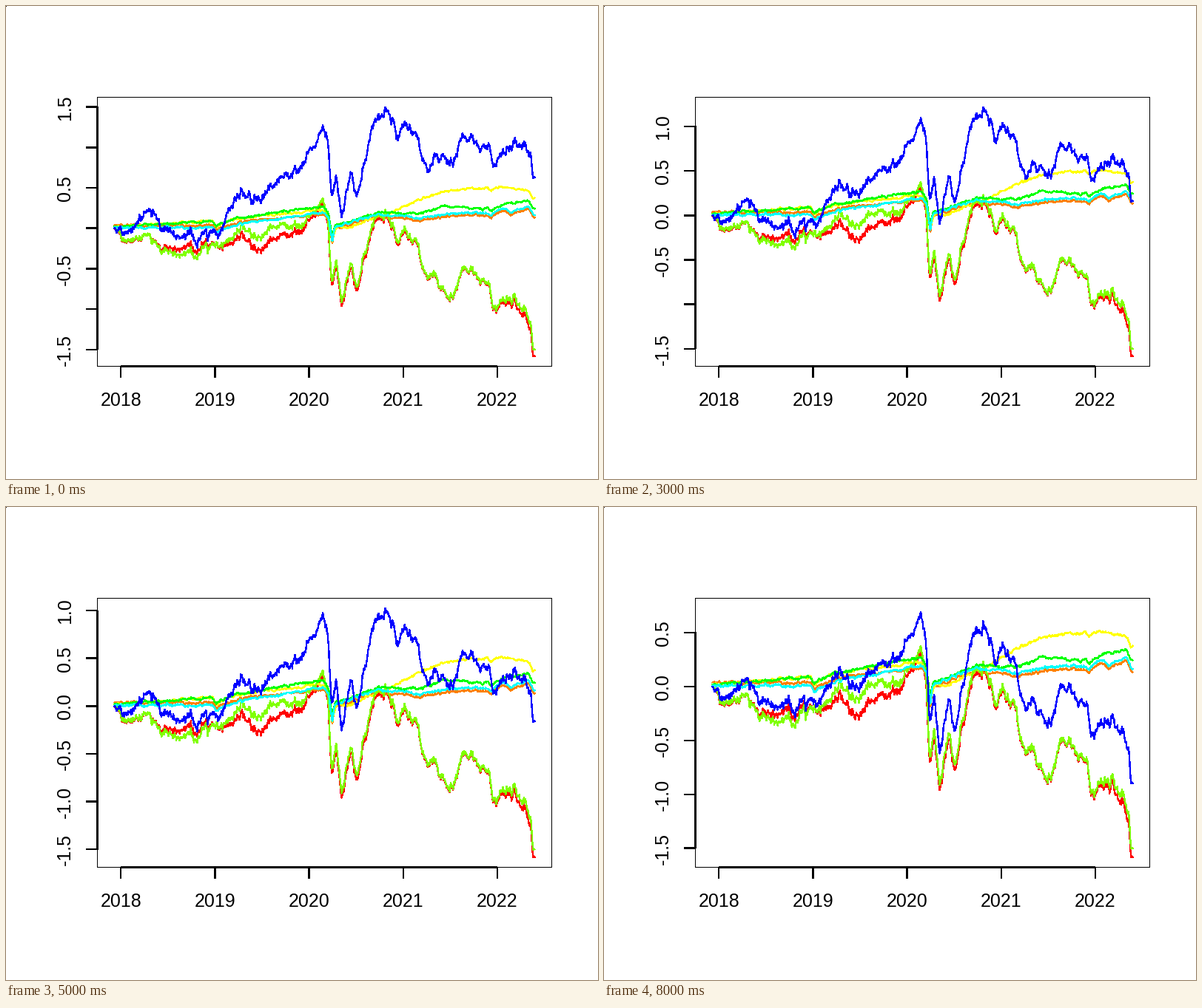
A matplotlib script that plays this animation: 800x640 px, repeating every 9000 ms.

```python
import numpy as np
import matplotlib.pyplot as plt
from matplotlib.animation import FuncAnimation

W, H, DPI = 800, 640, 100
LEFT, RIGHT, TOP, BOTTOM = 123.5, 737.5, 123.5, 487.5
PX = 72 / DPI
LOW = -1.584        # smallest value of any series
DAYS, STEPS = 1130, 9

rng = np.random.default_rng(7)
x = np.linspace(146, 715, DAYS)


def path(*points):
    """Piecewise-linear curve through (pixel x, value in hundredths)."""
    px, v = zip(*points)
    return np.interp(x, px, v) / 100


def bump(center, width):
    return np.exp(-((x - center) / width) ** 2)


def shock(at, depth, recovery):
    """Sudden fall that heals exponentially."""
    fall = np.clip((x - at + 5) / 5, 0, 1)
    return -depth * fall * np.exp(-np.maximum(x - at, 0) / recovery)


def jitter(sd, phi=0.8):
    """Mean-reverting daily noise, pinned to zero at both ends."""
    out = np.zeros(DAYS)
    for i, e in enumerate(rng.normal(0, sd * np.sqrt(1 - phi**2), DAYS - 1), 1):
        out[i] = phi * out[i - 1] + e
    return out * np.clip(np.minimum(x - 146, 715 - x) / 5, 0, 1)


def fund(*points, crash=0.27, recovery=3):
    return (path(*points) + shock(284, 0.08, 15) + shock(441, crash, recovery)
            + shock(656, 0.05, 5) + jitter(0.008))


# Volatile index, its close follower, and the blue portfolio's lead over it
red = path((146, 0), (172, -17), (190, -7), (209, -22), (257, -25), (270, -15),
           (295, -25), (317, -9), (342, -28), (367, -8), (400, 0), (428, 34),
           (436, 0), (440, -75), (446, -46), (454, -92), (467, -50),
           (474, -80), (495, 2), (516, 18), (530, -23), (538, -2), (557, -20),
           (564, -54), (578, -56), (587, -77), (604, -91), (617, -49),
           (652, -71), (657, -95), (688, -90), (709, -124), (712, -158),
           (715, -158))
red = np.maximum(red + jitter(0.033), LOW)
lime = (red - 0.09 * bump(245, 35) + 0.15 * bump(350, 45)
        + 0.04 * bump(470, 60) + 0.07 * bump(715, 40) + 0.01)
lead = path((146, 0), (197, 34), (230, 14), (288, 14), (304, 48), (358, 66),
            (420, 88), (436, 106), (516, 130), (575, 136), (590, 168),
            (640, 162), (715, 221)) + jitter(0.02)
loss = np.interp(x, [146, 428, 454, 715], [0.5, 0.62, 0.69, 0.69])

# Calm funds
yellow = fund((146, 2), (278, 9), (428, 23), (460, 0), (520, 20), (556, 34),
              (590, 45), (670, 52), (706, 46), (712, 36), (715, 38),
              crash=0.3, recovery=5)
green = fund((146, 2), (278, 9), (428, 27), (450, 5), (505, 19), (557, 18),
             (590, 28), (645, 24), (705, 35), (712, 25), (715, 24))
cyan = fund((146, 1), (278, 1), (428, 19), (450, 4), (505, 17), (557, 13),
            (620, 20), (650, 18), (672, 25), (682, 20), (705, 28), (712, 17),
            (715, 16))
orange = cyan - 0.03 * np.tanh((x - 380) / 60)

plt.rcParams["font.family"] = "Liberation Sans"
fig = plt.figure(figsize=(W / DPI, H / DPI), dpi=DPI, facecolor="white")
ax = fig.add_axes([0, 0, 1, 1])
ax.set_xlim(0, W)
ax.set_ylim(H, 0)
ax.axis("off")


def stroke(xs, ys, width, color="black", **kw):
    return ax.plot(xs, ys, color=color, lw=width * PX, antialiased=False,
                   solid_capstyle="butt", snap=False, **kw)[0]


def label(px, py, text, **kw):
    return ax.text(px, py, text, size=25 * PX, ha="center", va="baseline",
                   rotation_mode="anchor", **kw)


colors = ["#ff0000", "#ff8000", "#ffff00", "#80ff00", "#00ff00", "#00ffff",
          "#0000ff"]
lines = [stroke([], [], 1.35, c, solid_joinstyle="round") for c in colors]

stroke([LEFT, RIGHT, RIGHT, LEFT, LEFT], [TOP, TOP, BOTTOM, BOTTOM, TOP], 1)
years = 155.2 + 127.2 * np.arange(5)
stroke([years[0], years[-1]], [BOTTOM, BOTTOM], 3)
for i, px in enumerate(years):
    stroke([px, px], [BOTTOM, BOTTOM + 15], 1.56)
    label(px, 541, str(2018 + i))
stroke([0, 1], [0.5, 0.5], 1)

marks = np.arange(-1.5, 1.6, 0.5)
spine = stroke([], [], 3)
ticks = [stroke([], [], 1.56) for _ in marks]
names = [label(87, 0, f"{m:.1f}", rotation=90) for m in marks]


def draw(step):
    t = step / (STEPS - 1)
    share = 0.82 * t + 0.18 * t**8
    top = max(1.323 - 0.597 * share, 1.497 - 0.915 * share)
    inner = (BOTTOM - TOP) / 1.08
    scale = inner / (top - LOW)
    base = BOTTOM - 0.04 * inner

    def to_y(v):
        return base - (v - LOW) * scale

    blue = np.minimum(red + lead * (1 - share * loss), top)
    for line, s in zip(lines, [red, orange, yellow, lime, green, cyan, blue]):
        line.set_data(x, to_y(s))

    # Labels that would crowd the previous one are dropped
    end = np.inf
    for m, tick, name in zip(marks, ticks, names):
        y = to_y(m)
        inside = y > TOP
        tick.set_data([LEFT - 15, LEFT], [y, y])
        tick.set_visible(inside)
        half = (43.1 if m < 0 else 34.8) / 2
        fits = inside and y + half < end - 20.8
        name.set_y(y + 0.7)
        name.set_visible(fits)
        if fits:
            end = y - half
        if inside:
            spine.set_data([LEFT, LEFT], [to_y(marks[0]), y])
    return lines + ticks + names + [spine]


anim = FuncAnimation(fig, draw, frames=STEPS, interval=1000, repeat=True,
                     repeat_delay=0)
plt.show()
```
